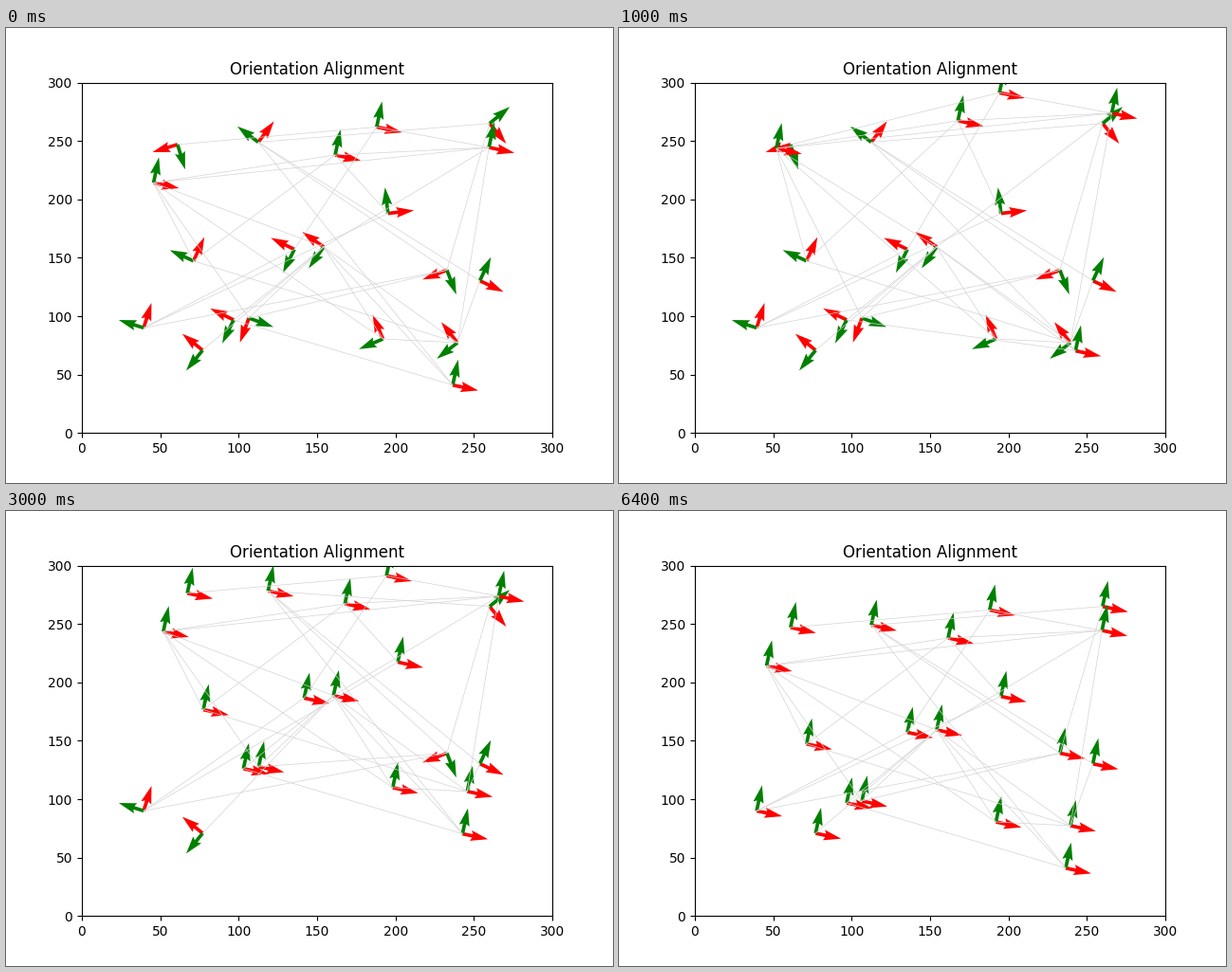
Recreate the animation shown at these times as a matplotlib script. Size 640 by 480 pixels, loop 8 s.

```python
import matplotlib.pyplot as plt
import numpy as np
from matplotlib.animation import FuncAnimation
from matplotlib.collections import LineCollection

GOAL = -12.0      # shared heading in degrees
STEP = 30.0       # how far an aligned agent jumps
FRAMES = 8

# x, y, first heading, frame from which the agent is aligned
AGENTS = {
    "a": (61, 247, 197, 2),
    "b": (112.5, 249, 53, 2),
    "c": (188, 262, GOAL, 0),
    "d": (161.5, 238, GOAL, 0),
    "e": (260, 265, -50.5, 4),
    "f": (259.6, 244.5, GOAL, 0),
    "g": (45.7, 214.2, GOAL, 0),
    "h": (195.2, 188, 6.5, 2),
    "i": (71.2, 147.3, 65.5, 2),
    "j": (135.5, 157.2, 154, 2),
    "k": (154.2, 159.3, 145, 2),
    "l": (232.8, 139.4, 201, 4),
    "m": (253.8, 130.3, -25, 4),
    "n": (39.4, 90, 72.5, 4),
    "o": (77, 70.8, 141, 4),
    "p": (96.8, 96.8, 154, 2),
    "q": (106.5, 98.4, 250, 2),
    "r": (192, 80.5, 113, 2),
    "s": (239.5, 77.3, 128, 2),
    "t": (236.5, 41, GOAL, 0),
}
LINKS = ("ac be bl bm bt cf cj df dg dh di el fg fk fs gi gk gq gr "
         "hn is jn kp kq kr ks kt ko ln lq ms pt rs").split()

names = list(AGENTS)
table = np.array(list(AGENTS.values()), dtype=float)
home, heading, start = table[:, :2], table[:, 2], table[:, 3]
pairs = np.array([[names.index(n) for n in link] for link in LINKS])


def unit(deg):
    rad = np.radians(deg)
    return np.stack([np.cos(rad), np.sin(rad)], axis=-1)


def state(frame):
    """Positions and headings; aligned agents jump out and back until all agree."""
    aligned = start <= frame
    angle = np.where(aligned, GOAL, heading)
    out = frame < 4 and frame % 2 == 1
    shift = STEP * unit(GOAL + 90) * out
    return home + aligned[:, None] * shift, angle


fig, ax = plt.subplots(figsize=(6.4, 4.8), dpi=100)
ax.set(xlim=(0, 300), ylim=(0, 300), title="Orientation Alignment")

count = len(names)
arrows = ax.quiver(*np.repeat(home, 2, axis=0).T,
                   np.ones(2 * count), np.zeros(2 * count),
                   color=["r", "g"] * count, scale=18, width=0.0075)
links = LineCollection([], colors="lightgray", linewidths=0.5, zorder=2)
ax.add_collection(links, autolim=False)


def draw(frame):
    pos, angle = state(frame)
    both = np.stack([angle, angle + 90], axis=1).ravel()
    arrows.set_offsets(np.repeat(pos, 2, axis=0))
    arrows.set_UVC(*unit(both).T)
    links.set_segments(pos[pairs])
    return arrows, links


anim = FuncAnimation(fig, draw, frames=FRAMES, interval=1000,
                     init_func=lambda: draw(0), repeat=True, repeat_delay=0)
plt.show()
```
